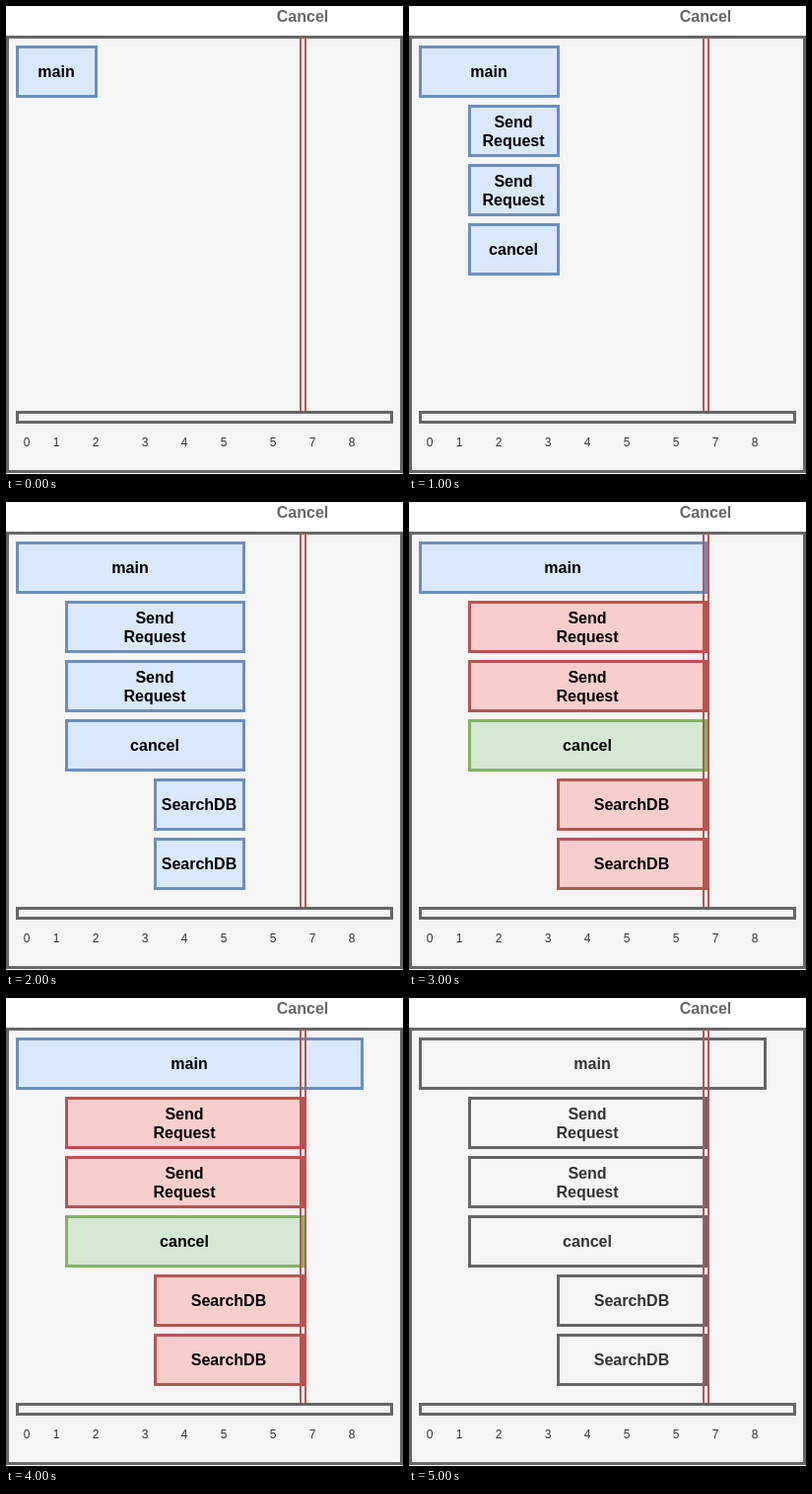
An HTML page for the animation above (6 s loop, 403x474 px).

```html
<!DOCTYPE html>
<html lang="en">
<head>
<meta charset="utf-8">
<title>Cancellation timeline</title>
<style>
  html, body { margin: 0; width: 100%; height: 100%; overflow: hidden; background: #fff; }
  svg { display: block; }
  rect { stroke-width: 3; }
  text { font: bold 16px "Liberation Sans", Arial, sans-serif; text-anchor: middle; }
  .panel { fill: #f5f5f5; stroke: #666; }
  .axis text { font-weight: normal; font-size: 12px; fill: #333; }
  .cancel-line { stroke: #b85450; stroke-width: 2; }
  .running rect { fill: #dae8fc; stroke: #6c8ebf; }
  .canceled rect { fill: #f8cecc; stroke: #b85450; }
  .done rect { fill: #d5e8d4; stroke: #82b366; }
  .closed rect { fill: #f5f5f5; stroke: #666; }
  .closed text { fill: #333; }
</style>
</head>
<body>
<svg width="403" height="474" viewBox="0 0 403 474">
  <rect class="panel" x="1.5" y="31.5" width="400" height="440"/>
  <text x="301" y="16" fill="#666">Cancel</text>
  <g id="tasks"></g>
  <path class="cancel-line" d="M299 31.5V411M304 31.5V411"/>
  <g class="axis">
    <rect class="panel" x="11.5" y="411.5" width="380" height="10"/>
  </g>
</svg>
<script>
const STEP_MS = 1000;
const CLOSED_STEP = 5;
const CANCEL_STEP = 3;
const ends = [91.5, 151.5, 241.5, 301.5, 361.5, 361.5];

// start: left edge; from: first visible step; outcome: state once cancelled
const tasks = [
  { lines: ["main"], start: 11.5, from: 0, outcome: "running" },
  { lines: ["Send", "Request"], start: 61.5, from: 1, outcome: "canceled" },
  { lines: ["Send", "Request"], start: 61.5, from: 1, outcome: "canceled" },
  { lines: ["cancel"], start: 61.5, from: 1, outcome: "done" },
  { lines: ["SearchDB"], start: 151.5, from: 2, outcome: "canceled" },
  { lines: ["SearchDB"], start: 151.5, from: 2, outcome: "canceled" },
];

function add(parent, tag, attrs = {}, content = "") {
  const node = document.createElementNS("http://www.w3.org/2000/svg", tag);
  for (const [name, value] of Object.entries(attrs)) node.setAttribute(name, value);
  node.textContent = content;
  return parent.appendChild(node);
}

const axis = document.querySelector(".axis");
const ticks = [[21, 0], [51, 1], [91, 2], [141, 3], [181, 4], [221, 5], [271, 5], [311, 7], [351, 8]];
for (const [x, label] of ticks) add(axis, "text", { x, y: 446 }, label);

const layer = document.getElementById("tasks");
tasks.forEach((task, row) => {
  const top = 41.5 + row * 60;
  task.group = add(layer, "g");
  task.box = add(task.group, "rect", { x: task.start, y: top, height: 50 });
  const baseline = top + (task.lines.length > 1 ? 21.5 : 30.5);
  task.labels = task.lines.map((line, i) =>
    add(task.group, "text", { y: baseline + i * 19 }, line));
});

function showStep(step) {
  tasks.forEach((task, row) => {
    const end = row === 0 ? ends[step] : Math.min(ends[step], ends[CANCEL_STEP]);
    const state = step >= CLOSED_STEP ? "closed"
      : step >= CANCEL_STEP ? task.outcome : "running";
    task.group.setAttribute("class", state);
    task.group.setAttribute("visibility", step >= task.from ? "visible" : "hidden");
    task.box.setAttribute("width", Math.max(0, end - task.start));
    for (const label of task.labels) label.setAttribute("x", (task.start + end) / 2 - 0.5);
  });
}

let startTime = performance.now();
function tick() {
  const elapsed = performance.now() - startTime;
  showStep(Math.floor(elapsed / STEP_MS) % ends.length);
  requestAnimationFrame(tick);
}
tick();
</script>
</body>
</html>
```
